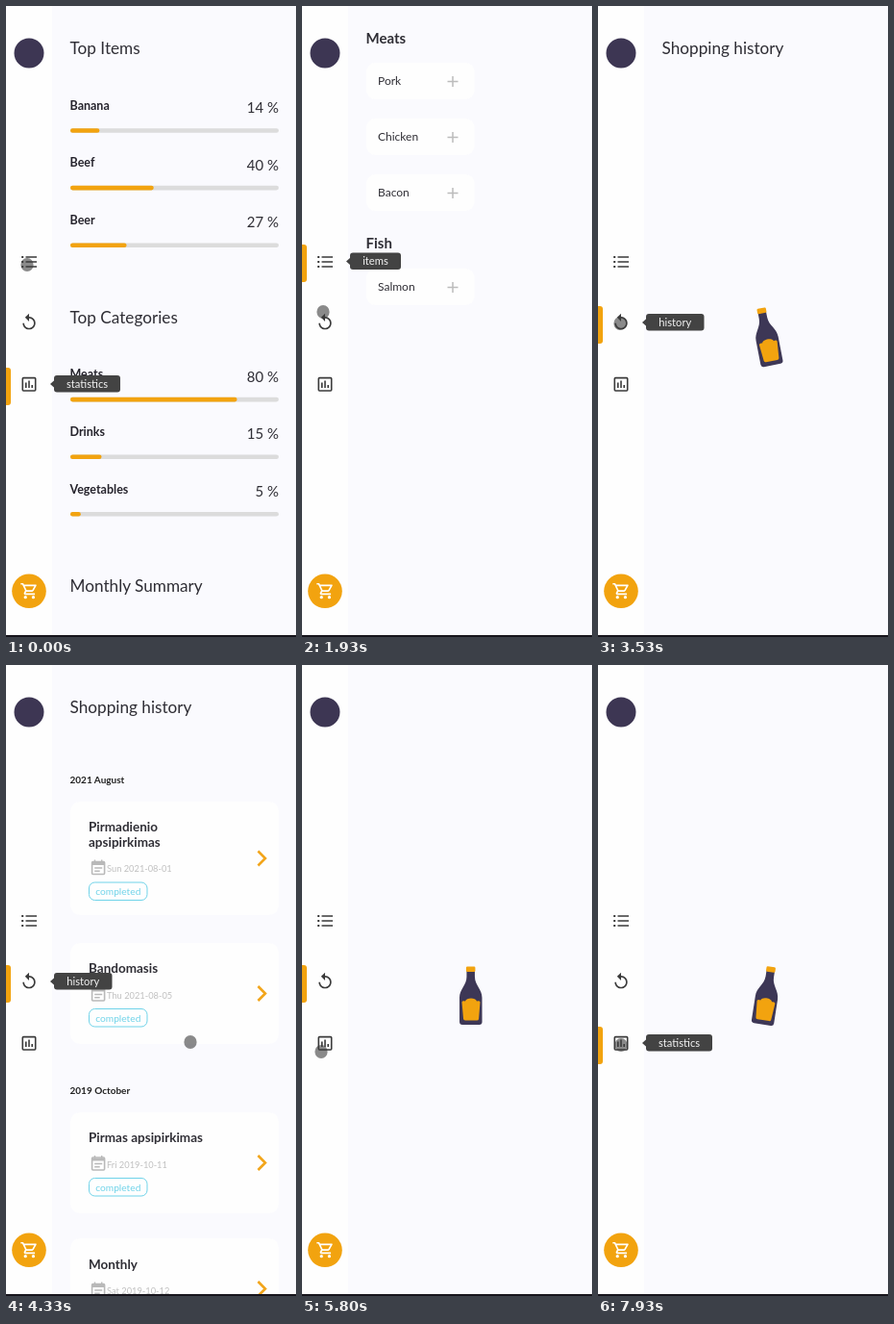
An HTML page for the animation above (8000 ms loop, 302 px wide and 656 px high).

```html
<!DOCTYPE html>
<html lang="en">
<head>
<meta charset="utf-8">
<title>Shopping list app</title>
<style>
  html, body { margin: 0; width: 100%; height: 100%; overflow: hidden; background: #fafafe; }
  svg { display: block; width: 100%; height: 100%; }
  text { font-family: Lato, "Open Sans", sans-serif; fill: #2f2e35; }
  .title { font-size: 17.2px; }
  .label { font-size: 12.5px; font-weight: 700; fill: #25232c; }
  .percent { font-size: 15px; text-anchor: end; }
  .group { font-size: 15px; font-weight: 700; }
  .item { font-size: 12px; }
  .month { font-size: 10px; font-weight: 700; fill: #222; }
  .name { font-size: 13.5px; font-weight: 700; }
  .date { font-size: 9.3px; fill: #c0c0c0; }
  .chip { font-size: 10.2px; fill: #6fd3e9; text-anchor: middle; }
  .tip { font-size: 11.2px; fill: #f3f3f3; text-anchor: middle; }
  .card { fill: #fefefe; }
  .icon { fill: none; stroke: #3a3a3a; }
</style>
</head>
<body>
<svg viewBox="0 0 302 656">
  <rect width="302" height="656" fill="#fafafe"/>
  <g id="pages"></g>

  <g id="bottle">
    <path d="M171.5 318H180V324C180 333 187.5 337 187.5 346V371Q187.5 374 184.5 374H167Q164 374 164 371V346C164 337 171.5 333 171.5 324Z" fill="#3d3756"/>
    <rect x="171" y="313.5" width="9.5" height="5.5" rx="1.2" fill="#f2a30f"/>
    <path d="M166.5 350.5Q167 348.5 170 349.5C171 345.5 181 345.5 182 349.5Q185 348.5 185.5 350.5L184 368Q183.8 369.5 182 369.5H170Q168.2 369.5 168 368Z" fill="#f2a30f"/>
  </g>

  <rect width="48" height="656" fill="#fefefe"/>
  <circle cx="24" cy="49" r="15.5" fill="#3d3653"/>
  <path id="marker" d="M0 0H2Q5 0 5 3V36Q5 39 2 39H0Z" fill="#f2a30f"/>

  <g class="icon" stroke-width="1.7">
    <path d="M20.5 261H32M20.5 266H32M20.5 271H32"/>
    <path d="M16.2 261h2M16.2 266h2M16.2 271h2" stroke-width="2"/>
  </g>
  <path transform="translate(14 318.8) scale(.835)" fill="#3a3a3a" d="M12 5V1L7 6l5 5V7c3.31 0 6 2.69 6 6s-2.69 6-6 6-6-2.69-6-6H4c0 4.42 3.58 8 8 8s8-3.58 8-8-3.58-8-8-8z"/>
  <g class="icon" stroke-width="1.6">
    <rect x="17.3" y="386.6" width="13.4" height="13.4" rx="1"/>
    <path d="M20.8 391.5V397M24 389.5V397M27.2 394V397"/>
  </g>
  <circle cx="24" cy="608.3" r="17.8" fill="#f2a30f"/>
  <g transform="translate(14.5 598.3) scale(.82)" fill="#fff">
    <path d="M15.55 13c.75 0 1.41-.41 1.75-1.03l3.58-6.49A.996.996 0 0 0 20.01 4H5.21l-.94-2H1v2h2l3.6 7.59-1.35 2.44C4.52 15.37 5.48 17 7 17h12v-2H7l1.1-2h7.45zM6.16 6h12.15l-2.76 5H8.53L6.16 6z"/>
    <circle cx="7" cy="20" r="2"/><circle cx="17" cy="20" r="2"/>
  </g>

  <rect id="flash" width="48" height="39" fill="#33b5e5"/>
  <g id="tips"></g>
  <ellipse id="touch" rx="6.6" ry="7" fill="#3c3c3c" fill-opacity=".6"/>
  <rect y="654" width="302" height="2" fill="#17151c"/>
</svg>
<script>
const LOOP = 8000;
const $ = id => document.getElementById(id);
const text = (cls, x, y, s) => `<text class="${cls}" x="${x}" y="${y}">${s}</text>`;
const card = (x, y, w, h, r) => `<rect class="card" x="${x}" y="${y}" width="${w}" height="${h}" rx="${r}"/>`;

const meter = (name, value, y) =>
  text('label', 66.5, y, name) + text('percent', 284, y + 3.3, value + ' %') +
  `<rect x="67" y="${y + 19.5}" width="217" height="4.6" rx="2.3" fill="#dcdcdc"/>
   <rect x="67" y="${y + 19.5}" width="${2.17 * value}" height="4.6" rx="2.3" fill="#f2a30f"/>`;
const meters = (y, rows) => rows.map(([name, value], i) => meter(name, value, y + 59.6 * i)).join('');

const item = (name, y) => card(67, y - 19, 112.5, 38, 9) + text('item', 79, y + 4, name) +
  `<path d="M151.5 ${y + .5}h11M157 ${y - 5}v11" stroke="#bcbcbc" stroke-width="1.5"/>`;

// y is the middle of the date line
const trip = (lines, date, y, top, height) => card(67, top, 217, height, 10) +
  lines.map((s, i) => text('name', 86, y - 22 - 16 * (lines.length - 1 - i), s)).join('') +
  `<g fill="none" stroke="#b9b9b9" stroke-width="1.6">
     <rect x="89.6" y="${y - 6}" width="13" height="13" rx="1"/>
     <path d="M89.6 ${y - 4}h13" stroke-width="3"/>
     <path d="M92.5 ${y - 8}v3M99.7 ${y - 8}v3M92.2 ${y + .5}h8M92.2 ${y + 3.7}h5.5" stroke-width="1.4"/>
   </g>` + text('date', 105, y + 4.5, date) +
  `<rect x="86.5" y="${y + 15.5}" width="60.5" height="18.5" rx="6" fill="none" stroke="#6fd3e9"/>` +
  text('chip', 116.8, y + 28.5, 'completed') +
  `<path d="M262.5 ${top + height / 2 - 7.5}l7.5 7.5l-7.5 7.5" fill="none" stroke="#f2a51a" stroke-width="2.6"/>`;

const pages = {
  stats: text('title', 66.5, 50, 'Top Items') +
    meters(107.7, [['Banana', 14], ['Beef', 40], ['Beer', 27]]) +
    text('title', 66.5, 329.6, 'Top Categories') +
    meters(387.3, [['Meats', 80], ['Drinks', 15], ['Vegetables', 5]]) +
    text('title', 66.5, 609, 'Monthly Summary'),
  items: text('group', 66.5, 38.8, 'Meats') + item('Pork', 78) + item('Chicken', 136) + item('Bacon', 194) +
    text('group', 66.5, 252, 'Fish') + item('Salmon', 292),
  title: text('title', 66.5, 50, 'Shopping history'),
  list: text('month', 66.5, 122.5, '2021 August') +
    trip(['Pirmadienio', 'apsipirkimas'], 'Sun 2021-08-01', 210.5, 142, 118) +
    trip(['Bandomasis'], 'Thu 2021-08-05', 342, 289, 105) +
    text('month', 66.5, 445.5, '2019 October') +
    trip(['Pirmas apsipirkimas'], 'Fri 2019-10-11', 518, 465, 105) +
    trip(['Monthly'], 'Sat 2019-10-12', 649.5, 596, 105)
};
const tips = { items: [53, 265.5], history: [60.5, 329], stats: [69, 393] };
const tipText = { items: 'items', history: 'history', stats: 'statistics' };

$('pages').innerHTML = Object.entries(pages).map(([k, s]) => `<g id="page-${k}">${s}</g>`).join('');
$('tips').innerHTML = Object.entries(tips).map(([k, [w, y]]) =>
  `<g id="tip-${k}"><rect x="50" y="${y - 9}" width="${w}" height="17.5" rx="3" fill="#434343"/>
   <path d="M46 ${y}l4.5-4v8z" fill="#434343"/>${text('tip', 50 + w / 2, y + 3.6, tipText[k])}</g>`).join('');

// Each schedule lists [start time, state].
const views = [[0, 'stats'], [660, 'items'], [3260, 'title bottle'], [3860, 'title list'], [5730, 'bottle']];
const tipTimes = [[0, 'stats'], [130, ''], [270, 'items'], [2200, ''], [2600, 'history'], [4460, ''], [6860, 'stats']];
const markers = [[0, 376], [660, 248], [3260, 312], [7260, 376]];
const swings = [[0, 0], [3430, 0], [5800, 0], [7260, 250]];
const path = [[0, 22, 269], [1660, 22, 269], [1930, 22, 318], [2200, 23, 330], [4060, 23, 330],
  [4330, 192, 392], [4860, 175, 420], [5330, 175, 420], [5730, 20, 402], [6800, 20, 402], [6930, 24, 395], [LOOP, 24, 395]];

const at = (list, t) => list.filter(e => e[0] <= t).pop();
const show = (id, on) => $(id).setAttribute('visibility', on ? 'visible' : 'hidden');
const place = (id, x, y) => $(id).setAttribute('transform', `translate(${x} ${y})`);

function bottleAngle(t) {
  if (t < 3430) return 0;
  const held = t >= 6050 && t < 7260 ? 6050 : t;
  const [start, phase] = at(swings, held);
  return -18.5 * Math.sin(2 * Math.PI * (held - start + phase) / 1000);
}

function touchPoint(t) {
  const i = path.findIndex(p => p[0] > t);
  const [t0, x0, y0] = path[i - 1], [t1, x1, y1] = path[i];
  const k = (t - t0) / (t1 - t0), e = k * k * (3 - 2 * k);
  return [x0 + (x1 - x0) * e, y0 + (y1 - y0) * e];
}

function draw(t) {
  const view = at(views, t)[1].split(' ');
  for (const k in pages) show('page-' + k, view.includes(k));
  show('bottle', view.includes('bottle'));
  $('bottle').setAttribute('transform', `rotate(${bottleAngle(t)} 176 344)`);

  const tip = at(tipTimes, t)[1];
  for (const k in tips) show('tip-' + k, k === tip);

  const [since, y] = at(markers, t);
  place('marker', 0, y);
  place('flash', 0, y);
  const age = t - since;
  $('flash').setAttribute('opacity', since ? .4 * Math.max(0, Math.min(1, (200 - age) / 100)) : 0);
  place('touch', ...touchPoint(t));
}

const begin = performance.now();
function tick() {
  draw((performance.now() - begin) % LOOP);
  requestAnimationFrame(tick);
}
tick();
</script>
</body>
</html>
```
